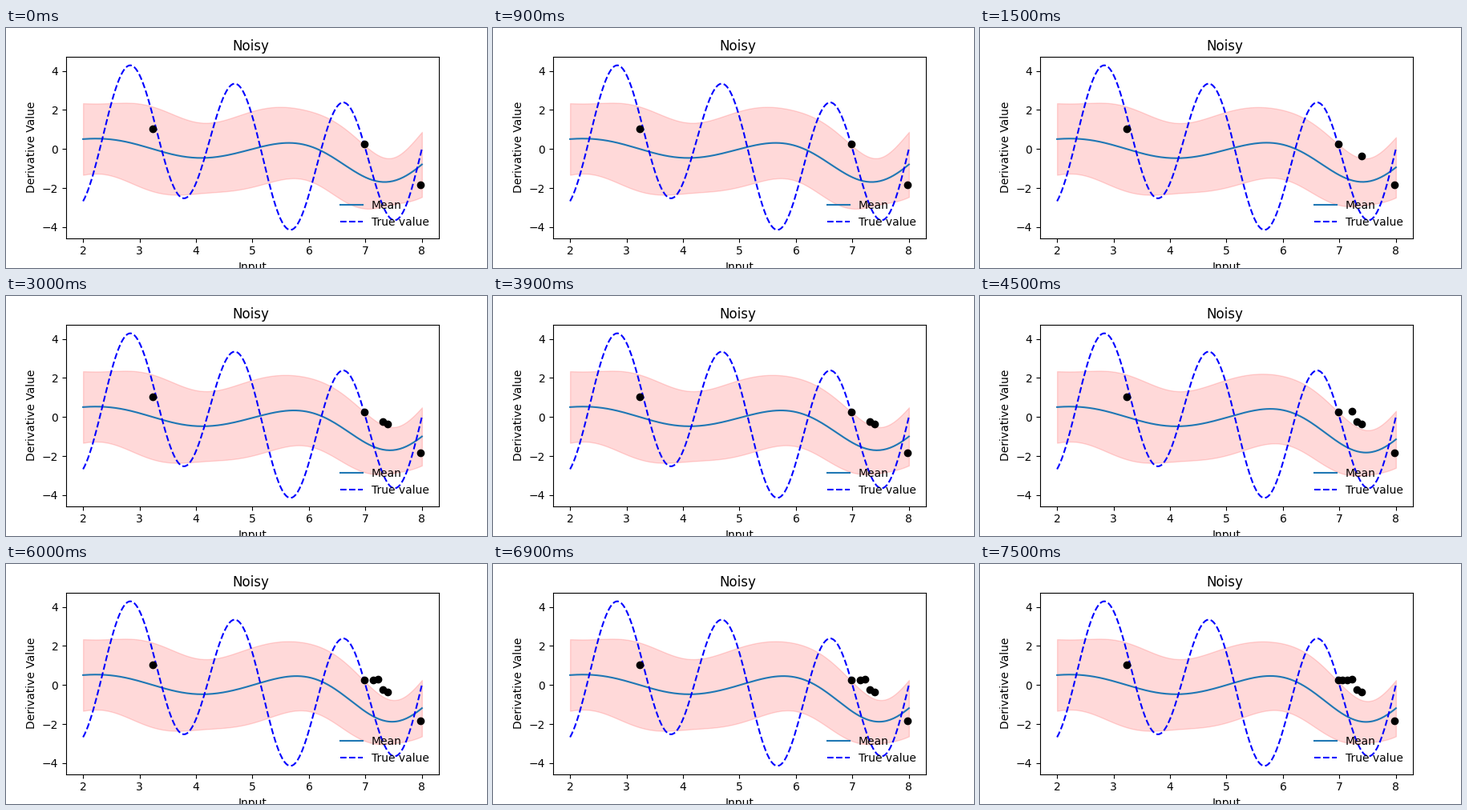
A matplotlib script that plays this animation: 600 by 300 pixels, repeating every 8000 ms.

```python
import numpy as np
import matplotlib.pyplot as plt
from matplotlib.animation import FuncAnimation

plt.rcParams["font.family"] = "DejaVu Sans"

# Noisy samples of -sin(x) - sin(10x/3), in the order they are added
SAMPLES = np.array([
    (3.226, 1.02), (6.973, 0.25), (7.967, -1.84), (7.385, -0.37),
    (7.30, -0.25), (7.215, 0.29), (7.13, 0.25), (7.045, 0.25),
])
START = 3            # samples known at the beginning
NOISE = 0.165        # noise variance relative to the kernel variance
BAND = 2.17          # half width of the prior derivative band
TICKS_PER_STEP = 3   # one sample every 1500 ms

grid = np.linspace(2, 8, 200)


def true_slope(x):
    return -np.cos(x) - 10 / 3 * np.cos(10 * x / 3)


def kernel(a, b):
    return np.exp(-0.5 * (a[:, None] - b) ** 2)


def slope_posterior(count):
    """Mean and half band of the derivative of a unit-length RBF process."""
    x, y = SAMPLES[:count].T
    inverse = np.linalg.inv(kernel(x, x) + NOISE * np.eye(count))
    cross = (x - grid[:, None]) * kernel(grid, x)
    mean = cross @ inverse @ y
    variance = 1 - np.sum((cross @ inverse) * cross, axis=1)
    return mean, BAND * np.sqrt(variance)


fig, ax = plt.subplots(figsize=(6, 3), dpi=100)
fig.subplots_adjust(left=0.125, right=0.9, bottom=0.125, top=0.88)

mean_line, = ax.plot(grid, np.zeros_like(grid), color="#1f77b4", label="Mean")
ax.plot(grid, true_slope(grid), "b--", label="True value")
dots, = ax.plot([], [], "ko")
band = None

ax.set_title("Noisy", x=0.4946)
ax.set_xlabel("Input")
ax.set_ylabel("Derivative Value")
ax.legend(loc="lower right", frameon=False)
ax.set_xlim(1.7, 8.3)
ax.set_ylim(-4.56, 4.72)


def update(tick):
    global band
    count = START + tick // TICKS_PER_STEP
    mean, half = slope_posterior(count)
    if band is not None:
        band.remove()
    band = ax.fill_between(grid, mean - half, mean + half, color="r", alpha=0.15)
    mean_line.set_ydata(mean)
    dots.set_data(*SAMPLES[:count].T)
    return band, mean_line, dots


anim = FuncAnimation(fig, update, frames=16, interval=500,
                     repeat=True, repeat_delay=0, blit=False)
plt.show()
```
